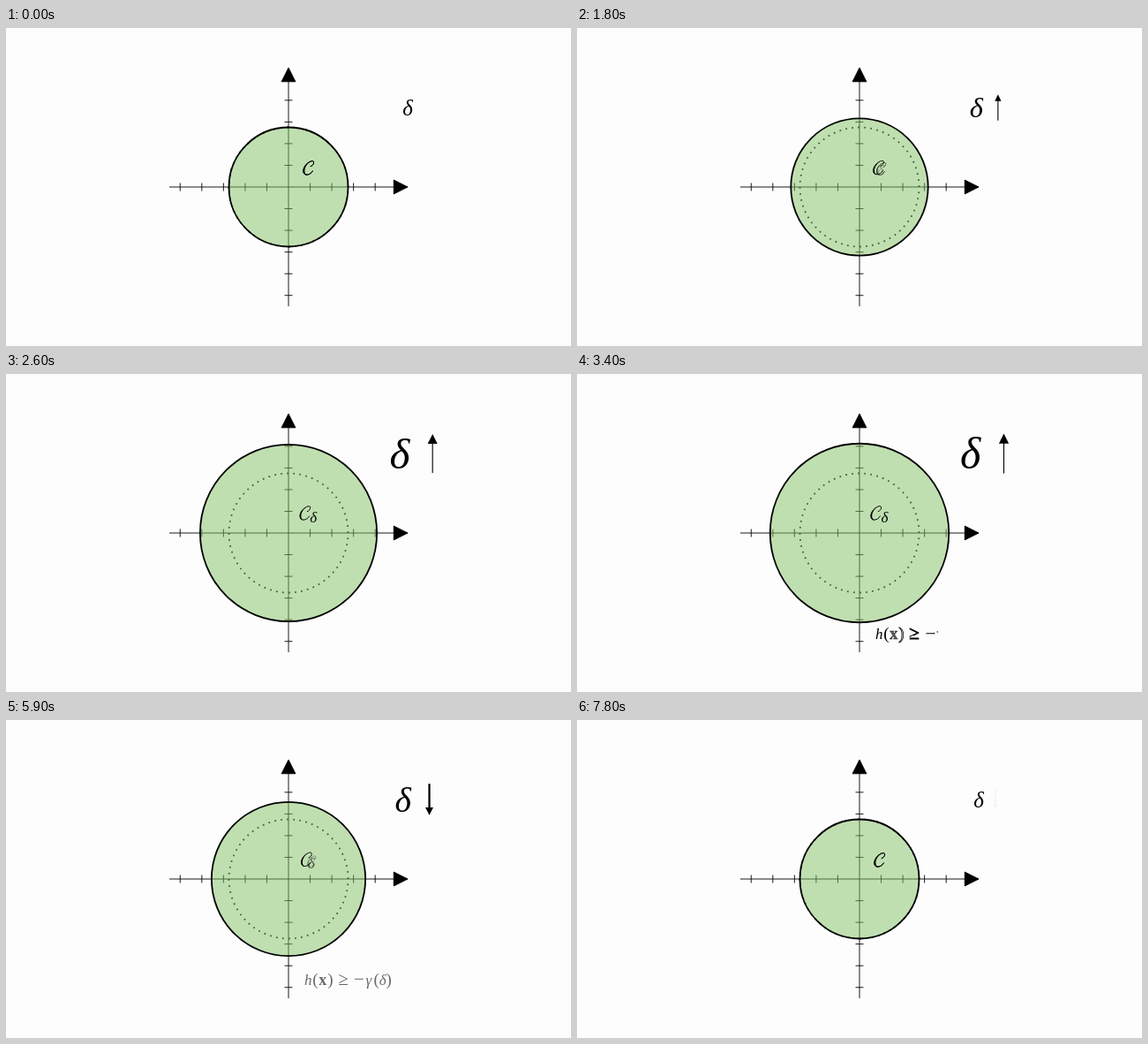
Write an HTML page that moves like this. It is 640x360 px and loops after 8 s.

```html
<!DOCTYPE html>
<html lang="en">
<head>
<meta charset="utf-8">
<title>Set growing with delta</title>
<style>
  html, body { margin: 0; width: 100%; height: 100%; overflow: hidden; background: #fdfdfd; }
  svg { display: block; width: 100vw; height: 100vh; }
  text { font-family: "Liberation Serif", "Noto Serif", serif; text-anchor: middle; }
  .it { font-style: italic; }
  .bold { font-weight: bold; }
</style>
</head>
<body>
<svg viewBox="0 0 640 360">
  <defs>
    <g id="scriptC">
      <path d="M9.2 6.6C11 6.3 12.9 3.8 12.6 1.8C12.3 .2 10.3 .4 8.6 1.2C4.2 3.2 .9 7.6 .9 11.6C.9 14.6 2.6 16.2 5 16.1C7.8 16 10.2 14.2 11.3 12"
        fill="none" stroke="#000" stroke-width=".95" stroke-linecap="round"/>
      <path d="M8.6 1.2C3.6 4 .6 8 .6 11.9C.6 14.8 2.4 16.5 4.8 16.4C3 15.6 2.2 14 2.2 11.6C2.2 8 4.8 3.6 8.6 1.2Z"/>
    </g>
    <g id="axis">
      <path id="ticks" stroke="#000" stroke-width=".9"/>
      <path d="M119.25-7.9L135 0L119.25 7.9Z" stroke="#000" stroke-width=".9"/>
    </g>
  </defs>
  <use href="#axis" transform="translate(320 180)"/>
  <use href="#axis" transform="translate(320 180) rotate(-90)"/>
  <path id="dots" fill="none" stroke="#000" stroke-width="1.8"/>
  <circle id="disc" cx="320" cy="180" fill="#83c167" fill-opacity=".5" stroke="#000" stroke-width="1.8"/>
  <use id="setC" href="#scriptC"/>
  <use id="subC" href="#scriptC"/>
  <text id="subDelta" class="it" font-size="17">δ</text>
  <g id="formula"></g>
  <text id="delta" class="it" font-size="25" x="-9.4" y="8.6">δ</text>
  <g id="arrow">
    <path id="shaft" stroke="#000"/>
    <path id="head"/>
  </g>
</svg>
<script>
const $ = id => document.getElementById(id);
const set = (el, attrs) => { for (const k in attrs) el.setAttribute(k, attrs[k]); };
const clamp = v => Math.min(1, Math.max(0, v));
const mix = (a, b, k) => a + (b - a) * k;
const sigmoid = v => 1 / (1 + Math.exp(-v));
const EDGE = sigmoid(-5);
const smooth = v => clamp((sigmoid(10 * (clamp(v) - .5)) - EDGE) / (1 - 2 * EDGE));

const LOOP = 8000, STEP = 100, LEAD = 35;
const R = 67.5, EM = 17;

// axis with unit ticks
let d = 'M-135 0H135';
for (let i = -5; i <= 5; i++) if (i) d += `M${i * 270 / 11}-4.5v9`;
$('ticks').setAttribute('d', d);

// dotted reference circle
d = '';
const onRing = a => `${320 + R * Math.cos(a)} ${180 - R * Math.sin(a)}`;
for (let i = 0; i < 60; i++) {
  const a = i * Math.PI / 30;
  d += `M${onRing(a)}L${onRing(a + .026)}`;
}
$('dots').setAttribute('d', d);

// glyph, class, font size, advance in em, gap before in em, outline length in px
const GLYPHS = [
  ['h', 'it', 17, .576, 0, 56],
  ['(', '', 19, .389, 0, 36],
  ['x', 'bold', 18, .607, 0, 56],
  [')', '', 19, .389, 0, 36],
  ['≥', '', 21, .778, .278, 46],
  ['−', '', 21, .778, .278, 24],
  ['γ', 'it', 17, .518, 0, 42],
  ['(', '', 19, .389, .056, 36],
  ['δ', 'it', 17, .444, 0, 46],
  [')', '', 19, .389, 0, 36]
];
let penX = 337.3;
const glyphs = GLYPHS.map(([ch, cls, size, adv, gap, len]) => {
  const el = document.createElementNS('http://www.w3.org/2000/svg', 'text');
  penX += gap * EM;
  set(el, { class: cls, 'font-size': size, x: penX + adv * EM / 2, y: 299.5, stroke: '#000' });
  el.textContent = ch;
  penX += adv * EM;
  $('formula').append(el);
  return { el, len };
});

// trace each outline, then fill it, one glyph after another
function write(p) {
  const lag = .2, span = 1 + lag * (glyphs.length - 1);
  glyphs.forEach(({ el, len }, i) => {
    const k = clamp(p * span - i * lag);
    const fill = clamp(k * 2 - 1);
    set(el, {
      visibility: k > 0 ? 'visible' : 'hidden',
      'fill-opacity': fill,
      'stroke-width': .9 * (1 - fill),
      'stroke-dasharray': k < .5 ? `${k * 2 * len} 999` : 'none'
    });
  });
}

function drawArrow(s, flip, opacity) {
  const k = s * (1 - 2 * flip);
  const y = v => 90 + v * k;
  const x = 464.5 + 9.5 * s;
  set($('shaft'), { d: `M${x} ${y(11.25)}V${y(-6)}`, 'stroke-width': mix(1.12, 2.25, flip) });
  set($('head'), { d: `M${x} ${y(-11.25)}L${x + 2.81 * k} ${y(-5.62)}H${x - 2.81 * k}Z` });
  $('arrow').setAttribute('opacity', opacity);
}

function drawLabel(a) {
  $('setC').setAttribute('transform', `translate(${mix(336, 332, a)} ${mix(150, 149, a)})`);
  const x = mix(336, 344.5, a), y = mix(150, 156, a), s = mix(1, .65, a);
  set($('subC'), { transform: `translate(${x} ${y}) scale(${s})`, opacity: 1 - a });
  set($('subDelta'), { x: x + 6 * s, y: y + mix(17, 12, a), opacity: a });
}

function draw(ms) {
  const t = (Math.floor(ms % LOOP / STEP) * STEP + LEAD) / 1000;
  const shrink = smooth((t - 5) / 2);
  const grow = smooth((t - 1) / 2) - shrink;
  const s = 1 + grow;
  $('disc').setAttribute('r', R * (1 + grow / 2));
  $('delta').setAttribute('transform', `translate(464.5 90) scale(${s})`);
  drawArrow(s, smooth(t - 4), smooth(t) - smooth(t - 7));
  drawLabel(grow);
  write(clamp(t - 3));
  $('formula').setAttribute('opacity', 1 - shrink);
}

const start = performance.now();
function tick() {
  draw(performance.now() - start);
  requestAnimationFrame(tick);
}
tick();
</script>
</body>
</html>
```
